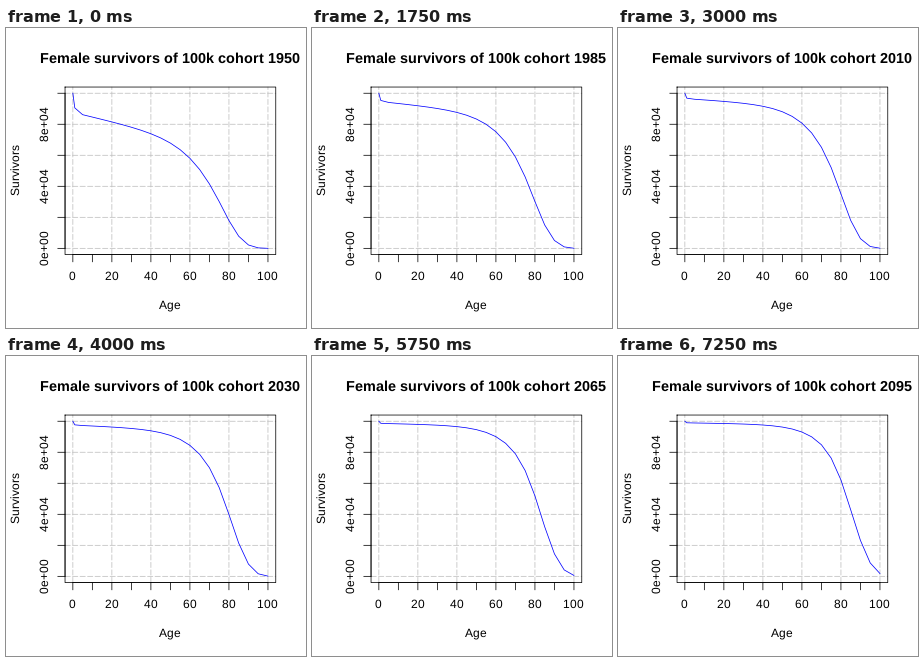
A matplotlib script that plays this animation: 300x300 px, repeating every 7.5 s.

```python
import numpy as np
import matplotlib.pyplot as plt
from matplotlib.animation import FuncAnimation
from matplotlib.patches import PathPatch
from matplotlib.path import Path
from matplotlib.textpath import TextPath

SIZE, DPI = 300, 72
FRAMES, INTERVAL = 30, 250
LEFT, RIGHT, TOP, BOTTOM = 59.04, 269.76, 59.04, 226.56
TICK, THIN = 7.2, 0.75

AGES = np.array([0, 1, *range(5, 101, 5)])

# Mortality levels at a few cohort years, joined by a smooth log trend.
YEARS = np.array([1950, 1985, 2010, 2050, 2095])
CHILD = [0.147, 0.060, 0.0387, 0.0192, 0.0110]
ADULT = [0.0034, 0.00133, 0.0008, 0.00035, 0.00018]
OLD = [1.316, 1.037, 0.948, 0.7245, 0.451]
TREND = np.polyfit((YEARS - 1950) / 100, np.log([CHILD, ADULT, OLD]).T, 4)


def survivors(year):
    """Share alive at each age: child, steady adult and Gompertz-like risk."""
    t = (year - 1950) / 100
    child, adult, old = np.exp(np.polyval(TREND, t))
    u = (AGES - 80) / 10
    aging = (0.87 + 0.07 * t) * u + (0.1 + 0.1 * t) * np.tanh(u)
    risk = child + adult * (AGES - 5) + old * np.exp(aging)
    risk[:2] = 0, child * (1 - 0.85 * np.sqrt(child))
    return np.exp(-risk)


def px(age):
    return LEFT + (RIGHT - LEFT) * (4 + age) / 108


def py(part):
    return BOTTOM - (BOTTOM - TOP) * (0.04 + part) / 1.08


fig = plt.figure(figsize=(SIZE / DPI, SIZE / DPI), dpi=DPI, facecolor="white")
ax = fig.add_axes([0, 0, 1, 1])
ax.set(xlim=(0, SIZE), ylim=(SIZE, 0))
ax.axis("off")


def rule(xs, ys, color="black", **style):
    return ax.plot(xs, ys, color=color, lw=THIN, snap=False, **style)[0]


def glyph(text, size, weight):
    font = dict(family="Liberation Sans", weight=weight)
    return TextPath((0, 0), text, size=size, prop=font)


def text_path(x, y, text, size=12, weight="normal", upright=False):
    """Outline of centred text whose letters advance by whole pixels."""
    def right_edge(s):
        return glyph(s, size, weight).vertices[:, 0].max()

    bar = right_edge("|")
    steps = [round(right_edge(c + "|") - bar) for c in text]
    half = sum(steps) / 2
    start = np.round([x, y + half] if upright else [x - half, y])
    parts, pen = [], 0
    for char, step in zip(text, steps):
        if char != " ":
            shape = glyph(char, size, weight)
            u, v = shape.vertices.T
            u = u + pen
            spot = np.column_stack([-v, -u] if upright else [u, -v])
            parts.append(Path(start + spot, shape.codes))
        pen += step
    return Path.make_compound_path(*parts)


def label(*args, **style):
    patch = PathPatch(text_path(*args, **style), fc="black", lw=0, snap=False)
    return ax.add_patch(patch)


def heading(year):
    return text_path((LEFT + RIGHT) / 2, 35,
                     f"Female survivors of 100k cohort {year}",
                     size=14.4, weight="bold")


grid = dict(color="gray", dashes=(7, 3), dash_capstyle="round")
grid["color"] = "#bebebe"
for k in range(6):
    gx, gy = px(20 * k), py(k / 5)
    rule([gx, gx], [BOTTOM, TOP], **grid)
    rule([LEFT, RIGHT], [gy, gy], **grid)

curve = rule([], [], "blue", solid_joinstyle="round")

rule([LEFT, RIGHT, RIGHT, LEFT, LEFT], [TOP, TOP, BOTTOM, BOTTOM, TOP])
rule([px(0), px(100)], [BOTTOM, BOTTOM])
rule([LEFT, LEFT], [py(0), py(1)])
for age in range(0, 101, 10):
    rule([px(age)] * 2, [BOTTOM, BOTTOM + TICK])
    if age % 20 == 0:
        label(px(age), 252, str(age))
for k in range(6):
    rule([LEFT - TICK, LEFT], [py(k / 5)] * 2)
    if k % 2 == 0:
        label(42, py(k / 5), f"{2 * k}e+0{4 if k else 0}", upright=True)

label((LEFT + RIGHT) / 2, 281, "Age")
label(13, (TOP + BOTTOM) / 2, "Survivors", upright=True)
title = ax.add_patch(PathPatch(heading(1950), fc="black", lw=0, snap=False))


def draw(i):
    year = 1950 + 5 * i
    curve.set_data(px(AGES), py(survivors(year)))
    title.set_path(heading(year))
    return curve, title


anim = FuncAnimation(fig, draw, frames=FRAMES, interval=INTERVAL,
                     init_func=lambda: draw(0), repeat=True)
plt.show()
```
